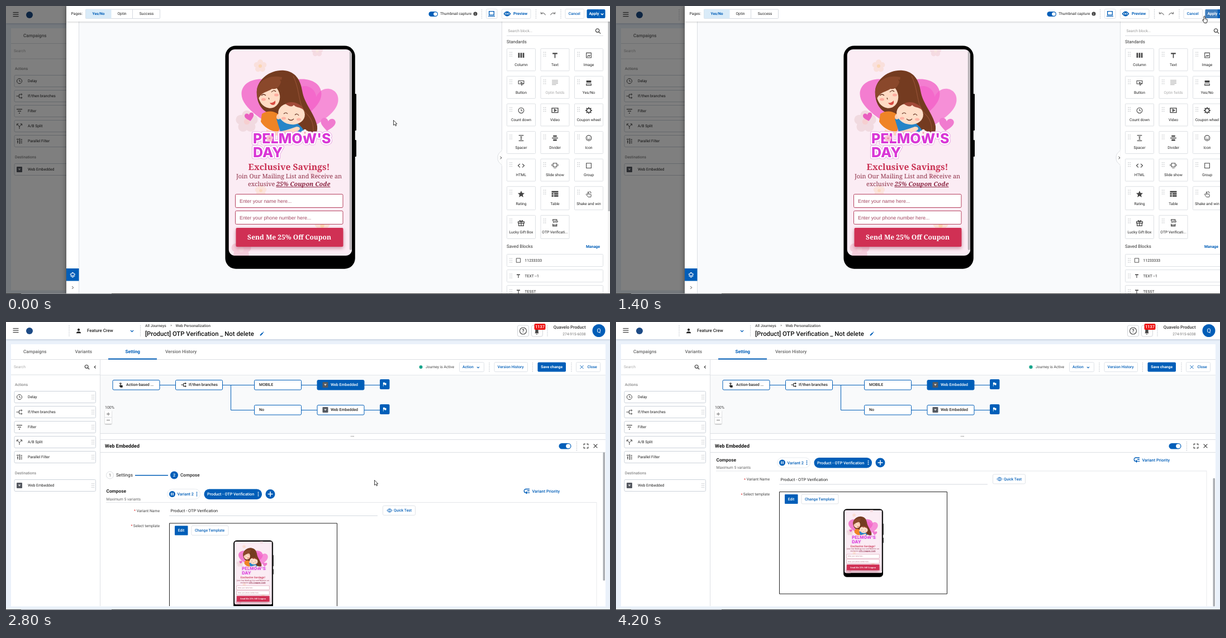
These frames come from a looping animation (1081x518 px, 4.4 s). An HTML page with a canvas:

```html
<!DOCTYPE html>
<html lang="en">
<head>
<meta charset="utf-8">
<title>Journey editor</title>
<style>
html, body { margin: 0; width: 100%; height: 100%; overflow: hidden; background: #fff; }
canvas { display: block; width: 1081px; height: 518px; }
</style>
</head>
<body>
<canvas id="stage" width="1081" height="518"></canvas>
<script>
const g = document.getElementById('stage').getContext('2d');
g.textRendering = 'geometricPrecision';
const LOOP = 4400, STEP = 200;
const BLUE = '#005eb8', INK = '#222', GREY = '#666', LINE = '#dcdfe3';
const UI = 'Roboto, sans-serif', SERIF = '"Noto Serif", serif', ARIAL = '"Liberation Sans", sans-serif';

// ---------- helpers ----------
function text(s, x, y, size = 6.8, color = INK, weight = 400, align = 'left', family = UI) {
  g.font = weight + ' ' + size + 'px ' + family;
  g.fillStyle = color;
  g.textAlign = align;
  g.fillText(s, x, y + size * 0.355);
}
function rect(x, y, w, h, color) {
  g.fillStyle = color;
  g.fillRect(x, y, w, h);
}
function box(x, y, w, h, r, fill, stroke, lw = 1) {
  g.beginPath();
  g.roundRect(x, y, w, h, r);
  if (fill) { g.fillStyle = fill; g.fill(); }
  if (stroke) { g.strokeStyle = stroke; g.lineWidth = lw; g.stroke(); }
}
function dot(x, y, r, color) {
  g.beginPath();
  g.arc(x, y, r, 0, 7);
  g.fillStyle = color;
  g.fill();
}
function ring(x, y, r, color, lw) {
  g.beginPath();
  g.arc(x, y, r, 0, 7);
  g.strokeStyle = color;
  g.lineWidth = lw;
  g.stroke();
}
function oval(x, y, rx, ry, rot, color) {
  g.beginPath();
  g.ellipse(x, y, rx, ry, rot, 0, 7);
  g.fillStyle = color;
  g.fill();
}
function shape(d, fill, stroke, lw = 1) {
  const p = new Path2D(d);
  if (fill) { g.fillStyle = fill; g.fill(p); }
  if (stroke) { g.strokeStyle = stroke; g.lineWidth = lw; g.stroke(p); }
}
// icon on a 24 unit grid, centred; lw 0 means filled
function icon(d, x, y, size, color, lw = 0) {
  g.save();
  g.translate(x - size / 2, y - size / 2);
  g.scale(size / 24, size / 24);
  lw ? shape(d, null, color, lw) : shape(d, color);
  g.restore();
}
function grip(x, y) {
  for (let i = 0; i < 6; i++) rect(x + (i % 2) * 3, y + (i >> 1) * 3.4, 1.3, 1.3, '#b5b8bc');
}
function dotted(x, y, h) {
  for (let i = 0; i < h; i += 3) rect(x, y + i, 1, 1.5, '#b9bec5');
}
function toggle(x, y, w, h) {
  box(x, y, w, h, h / 2, BLUE);
  dot(x + w - h / 2, y + h / 2, h / 2 - 1.2, '#fff');
}
function shadow(blur, color, dy = 0) {
  g.shadowBlur = blur;
  g.shadowColor = color;
  g.shadowOffsetY = dy;
}

const D = {
  down: 'M5 9l7 7 7-7', right: 'M9 5l7 7-7 7', left: 'M15 5l-7 7 7 7',
  menu: 'M2 5h20M2 12h20M2 19h20',
  search: 'M10 3a7 7 0 1 0 .01 0M15 15l7 7',
  clock: 'M12 3a9 9 0 1 0 .01 0M12 7v5l4 2',
  branch: 'M1 12h10M11 6h8M11 6v12h8M18 3l4 3-4 3M18 15l4 3-4 3',
  filter: 'M2 5h20M6 12h12M10 19h4',
  split: 'M12 22v-8L4 5M12 14l8-9M3 10V4h6M15 4h6v6',
  parallel: 'M2 5h8M4 11h4M6 11v9M13 2v20M17 6h5M17 12h5M17 18h5',
  column: 'M2 4h5v16H2zM9.5 4h5v16h-5zM17 4h5v16h-5z',
  type: 'M4 4h16v4h-6.5v13h-3V8H4z',
  image: 'M4 4h16v16H4zM7 17l4-5 3 3 3-4',
  button: 'M13 15H3V5h18v9M11 10l9 5-4 1-2 4z',
  optin: 'M2 3h20M2 8h20M2 13h20M2 18h14',
  yesno: 'M4 4h16v7H4zM3 14h18v7H3zm2 2v3h14v-3z',
  video: 'M2 4h20v15H2zM10 8v7l6-3.5z',
  wheel: 'M12 5a7 7 0 1 0 .01 0M12 1v6M12 17v6M1 12h6M17 12h6M4 4l4 4M16 16l4 4M20 4l-4 4M8 16l-4 4',
  spacer: 'M4 3h16M4 21h16M12 7v10M9 8h6M9 16h6',
  divider: 'M2 10.5h20v3H2zM6 3h12v5H6zM6 16h12v5H6z',
  smile: 'M12 3a9 9 0 1 0 .01 0M8 9v2M16 9v2M7 14q5 6 10 0',
  code: 'M8 6l-6 6 6 6M16 6l6 6-6 6',
  slides: 'M6 4h12v12H6zM2 7v6M22 7v6M8 20h2M11 20h2M14 20h2',
  square: 'M4 4h16v16H4z',
  star: 'M12 1l3.2 7.5 8 .7-6 5.3 1.8 8L12 18.3 5 22.5l1.8-8-6-5.3 8-.7z',
  table: 'M1 2h22v5H1zM1 9h6v5H1zM9 9h14v5H9zM1 16h6v5H1zM9 16h14v5H9z',
  shake: 'M10 22L3 13l2-2 4 3V5h3v7l8 2-1 8zM14 3l5 2M16 8h5',
  gift: 'M2 8h20v5H2zM4 13v9h16v-9M12 8v14M12 8C4 7 6 0 12 8c6-8 8-1 0 0',
  otp: 'M5 6V1h13v4M5 15v8h13v-8M5 19h13',
  laptop: 'M4 4h16v12H4zM1 20h22',
  eye: 'M1 12Q12-3 23 12 12 27 1 12zM12 8a4 4 0 1 0 .01 0',
  undo: 'M3 5v7h7M3 12q9-9 18 5', redo: 'M21 5v7h-7M21 12q-9-9-18 5',
  pencil: 'M3 17v4h4L18 10l-4-4zM16 4l2-2 4 4-2 2z',
  layers: 'M12 3l9 7-9 7-9-7zM3 15l9 7 9-7',
  flag: 'M5 3h8l1 3h6v10h-7l-1-3H7v9H5z',
  cross: 'M4 4l16 16M20 4L4 20',
  full: 'M3 9V3h6M15 3h6v6M21 15v6h-6M9 21H3v-6',
  bell: 'M5 18l2-3V9c0-7 10-7 10 0v6l2 3zM10 20h4v2h-4z',
  person: 'M12 2a5 5 0 1 0 .01 0M2 22c0-10 20-10 20 0z',
  tap: 'M9 22l-6-8 2-1 3 2V5h3v7l8 2-1 8zM5 8c-2-8 11-8 9 0h-1c0-5-7-5-7 0z',
  order: 'M22 4H9a6 6 0 0 0 0 13h4M10 13l4 4-4 4M14 10h8M17 17h5'
};

// ---------- phone artwork ----------
function heart(x, y, sx, sy, rot, color) {
  g.save();
  g.translate(x, y);
  g.rotate(rot);
  g.scale(sx, sy);
  shape('M0 10C-4 6-11 1-11-5-11-12-2-13 0-6 2-13 11-12 11-5 11 1 4 6 0 10z', color);
  g.restore();
}
function flower(x, y, r, color, core) {
  for (let i = 0; i < 5; i++) {
    const a = i * Math.PI * 0.4 - 1.57;
    dot(x + Math.cos(a) * r * 0.6, y + Math.sin(a) * r * 0.6, r * 0.46, color);
  }
  dot(x, y, r * 0.28, core);
}
function family() {
  heart(493, 181, 6.5, 4.6, 0, 'rgba(240,84,194,.72)');
  heart(553, 184, 3.6, 3.5, 0.12, 'rgba(245,96,200,.66)');
  heart(436, 200, 0.75, 0.7, -0.25, '#ea5fc0');
  heart(576, 214, 1.2, 1.1, 0.12, '#f07bcf');
  // long hair, clothes, then faces and arms
  shape('M449 150C453 130 474 114 498 116 518 118 527 133 530 152 534 177 552 192 557 216 558 228 553 235 549 236L528 226 484 196C458 194 447 174 449 150z', '#743b20');
  shape('M514 126C528 152 520 178 541 197 550 207 551 221 549 233', null, '#935034', 1.2);
  shape('M458 194C472 185 488 190 494 204L488 225C478 228 462 219 456 208z', '#ef8426');
  shape('M484 203C502 200 525 207 534 226L492 229z', '#2685c8');
  oval(471, 162, 19, 22, -0.3, '#ffdbc4');
  shape('M449 158C447 137 468 122 494 128 492 145 484 151 476 149 466 156 459 153 451 168z', '#8a482b');
  shape('M490 132C500 151 498 174 485 186 492 190 508 184 513 170L514 138z', '#743b20');
  oval(461, 168, 4, 2.5, 0, '#ffac9f');
  oval(484, 160, 4, 2.5, 0, '#ffac9f');
  shape('M457 161q4-4 8 0M475 155q4-5 8-1M470 165l1 3', null, '#633320', 1.2);
  shape('M472 174q6 1 10-4 1 8-4 8-4 0-6-4z', '#d84c42');
  oval(488, 199, 4, 5, 0.2, '#ffd0b5');
  oval(511, 194, 24, 19, 0.2, '#ffdec8');
  shape('M500 176C508 170 528 173 533 187 525 181 519 183 515 178 511 183 506 180 500 176z', '#a24a38');
  oval(497, 202, 4, 2.5, 0, '#ffb4a5');
  oval(524, 204, 4, 2.5, 0, '#ffb4a5');
  shape('M497 194q4-4 7 0M517 196q4-4 7 1M505 203q5 5 10 0', null, '#6c3929', 1.2);
  shape('M466 222C480 230 499 225 520 217 527 217 528 222 522 225 505 233 480 236 466 229z', '#ffd7bd');
}
function artTitle(s, x, y) {
  g.save();
  g.font = '800 25px Inter, sans-serif';
  g.textAlign = 'left';
  g.lineJoin = 'round';
  for (const [w, c] of [[6.5, '#e39be0'], [5, '#fff']]) {
    g.lineWidth = w;
    g.strokeStyle = c;
    g.strokeText(s, x, y);
  }
  g.fillStyle = '#d936d6';
  g.fillText(s, x, y);
  g.restore();
}
function field(label, y) {
  box(410.5, y, 192.5, 24, 2, '#fff', '#b5415f');
  text(label, 418, y + 12, 8.9, '#a34762', 400, 'left', ARIAL);
}
function phone() {
  box(623, 158, 4, 66, 1, '#000');
  box(623, 241, 4, 30, 1, '#000');
  box(392.4, 71.4, 232.4, 401.4, 19, '#000');
  g.save();
  g.beginPath();
  g.roundRect(398.7, 78, 220.3, 371, 11);
  g.clip();
  rect(398, 78, 222, 371, '#fbecf4');
  flower(455, 108, 11, '#fae0dc', '#fbd6b4');
  flower(557, 81, 10, '#f5dbe2', '#f9e4df');
  flower(431, 208, 19, '#f1dae0', '#f6cfd0');
  flower(553, 299, 11, '#f7dbe6', '#fbe6e7');
  flower(456, 332, 10, '#fbe3dc', '#fad9bd');
  flower(566, 395, 13, '#fbe0d4', '#fbd4ae');
  flower(421, 438, 17, '#f6cedc', '#f7d9e1');
  family();
  artTitle("PELMOW'S", 442, 247);
  artTitle('DAY', 442, 272);
  flower(472, 238, 6, '#f8c0d5', '#ee8fa9');
  flower(535, 228, 6, '#fff0f2', '#f5a5b5');
  text('Exclusive Savings!', 506.5, 289.5, 15.6, '#c93052', 600, 'center', SERIF);
  text('Join Our Mailing List and Receive an', 506.5, 306.5, 10.9, '#8f3048', 400, 'center', SERIF);
  text('exclusive', 433, 320, 10.9, '#8f3048', 400, 'left', SERIF);
  text('25% Coupon Code', 483.5, 320, 10.9, '#8a2340', 'italic 600', 'left', SERIF);
  rect(483.5, 325.2, 97, 1, '#8a2340');
  field('Enter your name here...', 338.5);
  field('Enter your phone number here...', 368.5);
  g.save();
  shadow(6, 'rgba(150,40,70,.45)', 3);
  box(411.5, 399, 192, 34, 2, '#d03054');
  g.restore();
  text('Send Me 25% Off Coupon', 507, 415.5, 12, '#fff', 700, 'center', SERIF);
  rect(614.5, 78, 4.5, 371, '#f5edf1');
  box(614.8, 80, 3.8, 359, 2, '#b9b3b8');
  g.restore();
}

// ---------- journey page ----------
function header() {
  g.save();
  shadow(3, 'rgba(40,70,110,.25)', 1);
  rect(0, 0, 1081, 31, '#fff');
  g.restore();
  icon(D.menu, 17.5, 15, 12, '#444', 2.5);
  dot(42, 16, 6, '#1c4a85');
  dotted(112.5, 6, 20);
  icon(D.person, 130, 16, 10, INK);
  text('Feature Crew', 145, 15.5, 7.9, INK, 500);
  icon(D.down, 225.5, 16, 9, BLUE, 3.5);
  dotted(240, 6, 20);
  text('All Journeys', 249, 6.5, 6.8, '#444', 500);
  text('»', 294, 6, 6.8, GREY);
  text('Web Personalization', 303.5, 6.5, 6.8, '#444', 500);
  text('[Product] OTP Verification _ Not delete', 249, 20.5, 11.35, '#111', 500);
  icon(D.pencil, 458, 21, 9, BLUE);
  box(915.5, 6, 20, 20, 3, '#fff', '#d3d6da');
  ring(925.5, 16, 6, '#444', 1.1);
  text('?', 925.5, 16, 9, '#333', 500, 'center');
  box(940.5, 6, 20, 20, 3, '#fff', '#d3d6da');
  icon(D.bell, 950, 17, 13, '#444');
  box(945.5, 3, 20, 11, 2, '#ee1515');
  text('1137', 955.5, 8.5, 7.3, '#fff', 500, 'center');
  dotted(968.5, 6, 20);
  text('Quavelo Product', 1037.5, 9, 7.8, '#333', 500, 'right');
  text('274-915-6038', 1037.5, 21.5, 6.7, '#777', 400, 'right');
  dot(1061, 15.5, 11.5, BLUE);
  text('Q', 1061, 15.5, 10.5, '#fff', 400, 'center');
}
function sideItem(label, path, y, lw = 2) {
  box(15, y - 10.5, 145.5, 21, 2, '#fff', '#ccd2da');
  icon(path, 24, y, 12, '#444', lw);
  text(label, 39, y);
  grip(153.5, y - 4);
}
function badge(x, y) {
  box(x - 5, y - 5, 10, 10, 1, '#555960');
  icon('M4 7h16l-8 11z', x, y, 7, '#ddd');
}
function sidebar() {
  text('Search', 14, 81, 6.8, '#aaa');
  icon(D.search, 145, 81, 10, '#333', 2.8);
  icon(D.left, 159.5, 81, 8, '#333', 3.5);
  rect(9, 94.5, 159, 1, LINE);
  text('Actions', 16, 113, 6.8, GREY);
  sideItem('Delay', D.clock, 135);
  sideItem('If/then branches', D.branch, 162);
  sideItem('Filter', D.filter, 189, 2.5);
  sideItem('A/B Split', D.split, 216);
  sideItem('Parallel Filter', D.parallel, 243, 2.5);
  text('Destinations', 16, 272, 6.8, GREY);
  sideItem('Web Embedded', '', 294);
  badge(24, 294);
  rect(168, 67, 1, 444, LINE);
}
function outlined(label, x, y, w, color = BLUE) {
  box(x + .5, y - 8.5, w, 17, 2, '#fff', '#dfe3e8');
  text(label, x + w / 2, y, 6.8, color, 500, 'center');
}
function node(label, x, y, tx, solid) {
  box(x + .5, y - 8.5, 84, 17.5, 2, solid ? BLUE : '#fff', BLUE);
  text(label, tx, y, 7, solid ? '#fff' : INK, 500);
}
function flow() {
  rect(169, 95, 904, 105, '#f9fafb');
  rect(169, 95, 904, 1, '#e4e7eb');
  shape('M275 113.5H444M402.5 113.5V158.5H444M528 113.5H670M528 158.5H670', null, BLUE, 1);
  node('Action-based ...', 190.5, 113, 215);
  icon(D.tap, 206, 113.5, 10, INK);
  node('If/then branches', 303, 113, 327);
  icon(D.branch, 318, 113, 10, INK, 2.5);
  node('MOBILE', 444, 113, 453);
  node('Web Embedded', 556.5, 113, 581, true);
  badge(571.5, 113);
  node('No', 444, 158, 453);
  node('Web Embedded', 556.5, 158, 581);
  badge(571.5, 158);
  for (const y of [112, 157]) {
    box(669, y - 9, 17.5, 18, 2, BLUE);
    icon(D.flag, 677.5, y, 9, '#fff');
  }
  text('100%', 177, 153.5, 7, '#444');
  g.save();
  shadow(2, 'rgba(0,0,0,.35)', 1);
  box(177, 159, 12, 24, 1, '#fff');
  g.restore();
  rect(177, 171, 12, 1, LINE);
  shape('M180 165.5h6M183 162.5v6M180 176.5h6', null, GREY, .9);
  rect(169, 200, 904, 1, LINE);
  rect(169, 201, 904, 10, '#fff');
  text('...', 620, 203, 8, INK, 500, 'center');
  rect(169, 211, 904, 1, LINE);
}
function compose(scroll) {
  g.save();
  g.beginPath();
  g.rect(169, 235, 904, 276);
  g.clip();
  g.translate(0, -scroll);
  ring(186, 275.5, 6.5, LINE, 1);
  text('1', 186, 275.5, 7.3, GREY, 400, 'center');
  text('Settings', 197, 275.5, 8.2);
  rect(231, 275, 59, 1.5, BLUE);
  dot(301, 275.5, 7, BLUE);
  text('2', 301, 275.5, 7.3, '#fff', 500, 'center');
  text('Compose', 312, 275.5, 8.1, INK, 500);
  text('Compose', 179.5, 304.5, 8.3, INK, 700);
  text('Maximum 5 variants', 179.5, 318.5, 6.8, GREY);
  rect(179, 324, 878, 1, '#e3e6ea');
  rect(1056.5, 324, 1, 300, '#e9ebee');
  box(288.5, 300.5, 59, 18, 9, '#fff', '#e8ebef');
  dot(297.5, 309.5, 5.5, BLUE);
  rect(295.3, 307, 1.4, 5, '#fff');
  rect(298.3, 307, 1.4, 5, '#fff');
  text('Variant 2', 306.5, 309.5, 7.3, BLUE, 500);
  box(354.5, 300.5, 103.5, 18.5, 9, BLUE);
  text('Product - OTP Verification', 360, 309.5, 7.25, '#fff', 500);
  for (let i = -1; i < 2; i++) {
    dot(341.5, 309.5 + i * 3, .9, BLUE);
    dot(451.5, 309.5 + i * 3, .9, '#fff');
  }
  dot(473, 309.5, 8.5, BLUE);
  shape('M468.5 309.5h9M473 305v9', null, '#fff', 1.5);
  icon(D.order, 932, 304.5, 12, BLUE, 2.6);
  text('Variant Priority', 941.5, 304.5, 7.4, BLUE, 500);
  text('*', 229, 340, 7, '#e03030');
  text('Variant Name', 275, 339.5, 6.8, '#444', 400, 'right');
  text('Product - OTP Verification', 294.5, 339.5, 7.4);
  rect(292, 348, 373, 1, '#d5dae0');
  box(674.5, 330.5, 58, 17, 2, '#fff', '#dfe3e8');
  icon(D.eye, 686.5, 339, 10, BLUE, 2.3);
  text('Quick Test', 694, 339, 6.8, BLUE, 500);
  text('*', 223.5, 367, 7, '#e03030');
  text('Select template', 275, 366.5, 6.8, '#444', 400, 'right');
  box(292.5, 362, 300, 183.5, 0, '#fff', '#222');
  box(302, 366.5, 23.5, 17, 1, BLUE);
  text('Edit', 313.5, 375, 6.8, '#fff', 500, 'center');
  outlined('Change Template', 331.5, 375, 66);
  g.save();
  g.translate(407, 392.7);
  g.scale(.305, .305);
  g.translate(-392, -71);
  phone();
  g.restore();
  g.restore();
  box(1068.5, scroll ? 281 : 234.5, 3.5, 230.5, 1, '#a9adb2');
}
function page(time) {
  rect(0, 0, 1081, 518, '#eaf1fa');
  rect(9, 40, 1064, 471.5, '#fff');
  header();
  text('Campaigns', 31, 53.5, 8.2, GREY, 500);
  text('Variants', 123.5, 53.5, 8.2, GREY, 500);
  text('Setting', 213.5, 53.5, 8.2, BLUE, 700);
  text('Version History', 285, 53.5, 8.2, GREY, 500);
  rect(9, 67, 1064, 1, LINE);
  rect(183, 65.5, 87, 2, BLUE);
  sidebar();
  const phase = (time + 400) % 1000 / 1000;
  if (phase > .5) dot(742.5, 81, 3 + (phase - .5) * 3, 'rgba(30,170,150,' + (1 - phase) + ')');
  dot(742.5, 81, 3, '#18a58c');
  text('Journey is Active', 751, 81, 6.75, '#444');
  outlined('', 811, 81, 44);
  text('Action', 817, 81, 6.8, BLUE, 500);
  icon(D.down, 845, 81.5, 7, BLUE, 3.5);
  dotted(864.5, 73, 17);
  outlined('Version History', 873.5, 81, 59.5);
  dotted(942, 73, 17);
  box(951.5, 72.5, 50.5, 17, 2, BLUE);
  text('Save change', 976.7, 81, 6.8, '#fff', 700, 'center');
  dotted(1011.5, 73, 17);
  outlined('', 1020, 81, 43);
  icon(D.cross, 1030.5, 81, 9, BLUE, 2.5);
  text('Close', 1040.5, 81, 6.8, BLUE, 500);
  flow();
  text('Web Embedded', 177, 222.5, 8.9, '#111', 700);
  toggle(989.5, 218, 22, 10.5);
  dotted(1021, 215, 16);
  icon(D.full, 1038, 223, 10, '#444', 3);
  icon(D.cross, 1055, 223, 10, '#444', 3);
  rect(169, 234, 904, 1, LINE);
  compose(time >= 3000 ? 56.5 : 0);
}

// ---------- editor drawer ----------
const BLOCKS = [
  ['Column', 'column', 0], ['Text', 'type', 0], ['Image', 'image', 2],
  ['Button', 'button', 2], ['Optin fields', 'optin', 2], ['Yes/No', 'yesno', 0],
  ['Count down', 'clock', 2], ['Video', 'video', 2.5], ['Coupon wheel', 'wheel', 3],
  ['Spacer', 'spacer', 2], ['Divider', 'divider', 0], ['Icon', 'smile', 2],
  ['HTML', 'code', 2.3], ['Slide show', 'slides', 2], ['Group', 'square', 2],
  ['Rating', 'star', 0], ['Table', 'table', 0], ['Shake and win', 'shake', 1.7],
  ['Lucky Gift Box', 'gift', 2.3], ['OTP Verificati...', 'otp', 2.3]
];
function toolbar(hover) {
  g.save();
  shadow(3, 'rgba(0,0,0,.2)', 1);
  rect(108, 0, 973, 28, '#fff');
  g.restore();
  text('Pages:', 116.5, 14, 6.8);
  box(142.5, 6, 133, 16.5, 1, '#fff', '#d5dae0');
  rect(142.5, 6, 46, 16.5, '#d9ebf8');
  rect(226, 6, 1, 16.5, '#d5dae0');
  text('Yes/No', 165.5, 14, 6.7, BLUE, 700, 'center');
  text('Optin', 207.5, 14, 6.8, INK, 400, 'center');
  text('Success', 251.5, 14, 6.8, INK, 400, 'center');
  toggle(756.5, 10, 16.5, 9);
  text('Thumbnail capture', 777, 14, 6.75);
  dot(840, 14, 3.5, '#444');
  text('i', 840, 14, 5, '#fff', 700, 'center');
  for (const x of [851, 948, 992.5]) dotted(x, 6, 17);
  outlined('', 859, 14, 19.5);
  icon(D.laptop, 869, 14, 13, BLUE, 2.5);
  outlined('', 887, 14, 51.5);
  icon(D.eye, 897, 14, 12, BLUE, 3);
  text('Preview', 908, 14, 7, BLUE, 700);
  icon(D.undo, 961.5, 14, 11, '#777', 2.3);
  icon(D.redo, 978.5, 14, 11, '#777', 2.3);
  outlined('Cancel', 1000.5, 14, 33.5);
  box(1039.5, 6, 33, 16, 2, BLUE);
  if (hover) rect(1040, 6, 21, 16, '#427fbd');
  rect(1061, 6, .7, 16, '#3f83c8');
  text('Apply', 1043.5, 14, 7, '#fff', 700);
  icon(D.down, 1067, 14.5, 8, '#fff', 4);
}
function blocks() {
  rect(887.5, 28, 193.5, 490, '#fff');
  rect(887, 28, 1, 490, LINE);
  text('Search block...', 898.5, 45, 6.7, '#999');
  icon(D.search, 1059.5, 45, 11, '#444', 2.8);
  rect(896, 53, 173, 1, LINE);
  text('Standards', 896, 64.5, 7.9, '#333');
  BLOCKS.forEach(([name, key, lw], i) => {
    const row = Math.floor(i / 3), x = 896.5 + (i % 3) * 60.5;
    const y = row < 6 ? 76.7 + row * 49.6 : 376.5;
    const low = row > 4 ? 1.5 : 0, c = i === 4 ? '#aaa' : '#444';
    box(x, y, 51, row < 5 ? 40 : 42, 1, '#fff', '#dde0e4');
    grip(x + 5, y + 6);
    icon(D[key], x + 25.5, y + 12 + low, 13, c, lw);
    if (key === 'otp') text('OTP', x + 26.5, y + 12, 5, INK, 700, 'center');
    text(name, x + 25.5, y + 29 + low, 6.75, i === 4 ? '#aaa' : INK, 400, 'center');
  });
  text('Saved Blocks', 896, 432.5, 7.9, '#333');
  text('Manage', 1063, 432.5, 6.9, BLUE, 700, 'right');
  ['11233333', 'TEXT --1', 'TESST'].forEach((name, i) => {
    const y = 446.5 + i * 28;
    box(896.5, y, 172, 22, 1, '#fff', '#dde0e4');
    grip(901.5, y + 7);
    icon(i ? D.type : D.square, 917, y + 11, i ? 9 : 11, '#444', i ? 0 : 2);
    text(name, 928.5, y + 11, 6.8);
  });
  rect(1077, 28, 4, 490, '#f4f4f4');
  rect(1077.5, 28, 3.5, 341, '#b9bbbe');
}
function drawer(dx, hover) {
  rect(0, 0, 1081, 518, 'rgba(0,0,0,.5)');
  g.save();
  g.translate(dx, 0);
  g.save();
  shadow(9, 'rgba(0,0,0,.45)');
  rect(108, 0, 990, 518, '#fff');
  g.restore();
  rect(131, 28, 757, 490, '#f9fafc');
  rect(130, 28, 1, 490, LINE);
  box(108, 472, 22.5, 22.5, 0, BLUE);
  icon(D.layers, 119.3, 483.5, 11, '#fff', 2.3);
  icon(D.right, 119.3, 506.5, 8, '#333', 3);
  phone();
  blocks();
  shape('M888 258C887 263 880 263 880 273 880 283 887 283 888 288z', '#fff', LINE);
  rect(887.6, 258, 2, 30, '#fff');
  icon(D.right, 885.5, 273, 8, '#333', 3);
  toolbar(hover);
  g.restore();
}

// ---------- pointer ----------
const TRACK = [
  [0, 693, 205], [200, 822, 155], [400, 985, 74], [600, 1060, 22], [800, 1050, 18],
  [1600, 1023, 45], [1800, 895, 77], [2000, 739, 190], [2200, 668, 250],
  [2400, 656, 296], [2600, 660, 287], [2800, 659, 284]
];
function pointer(time) {
  if (time >= 3400) return;
  const [, x, y] = TRACK.filter(p => p[0] <= time).pop();
  g.save();
  g.translate(x, y);
  g.lineJoin = 'round';
  if (time >= 800 && time < 1600) {
    shape('M2 1Q3.3-.8 4.3 1V5l3.8 1V9.5L7 12.5H3L0 8V6.5l2 1z', '#fff', '#111', .9);
  } else {
    shape('M.5.5V9.5l2.2-1.9 1.5 3.2 1.5-.7-1.5-3.1h2.7z', '#fff', '#111', .8);
  }
  g.restore();
}

function draw(now) {
  const time = Math.floor(now % LOOP / STEP) * STEP;
  page(time);
  if (time < 1600) drawer(time >= 1400 ? 15 : 0, time >= 800);
  rect(0, 517, 1081, 1, '#333');
  rect(27, 517, 162, 1, '#8b8d90');
  pointer(time);
}
function tick() {
  draw(performance.now());
  requestAnimationFrame(tick);
}
tick();
</script>
</body>
</html>
```
